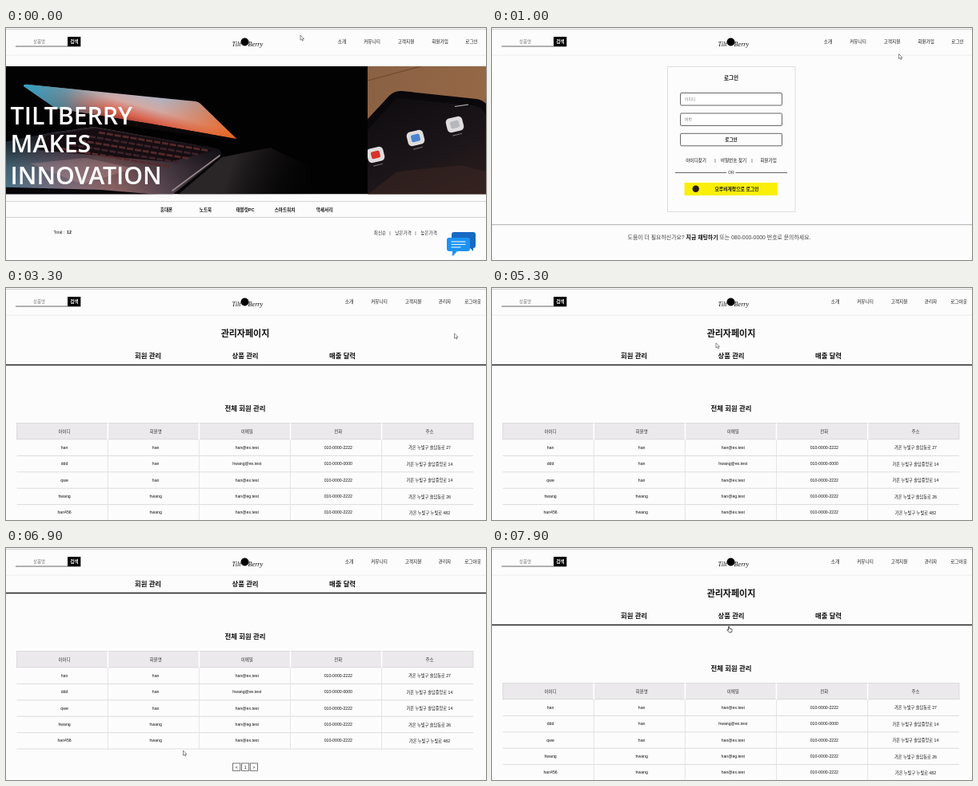
Recreate the animation shown at these times as an HTML page. Size 600x291 px, loop 8000 ms.

```html
<!DOCTYPE html>
<html>
<head>
<meta charset="utf-8">
<title>Shop walkthrough</title>
<style>
html, body { margin: 0; width: 100%; height: 100%; overflow: hidden; background: #fdfcfd; }
svg { display: block; width: 100vw; height: 100vh; }
text { font-family: "Liberation Sans", "Noto Sans CJK KR", "Noto Sans CJK", sans-serif; white-space: pre; }
.hero { font-family: "Open Sans", "Noto Sans", sans-serif; font-weight: 600; }
.logo { font-family: "Liberation Serif", serif; font-style: italic; }
</style>
</head>
<body>
<svg id="stage" viewBox="0 0 600 291" xmlns="http://www.w3.org/2000/svg"></svg>
<script>
const LOOP = 8000, STEP = 100, HEAD_H = 34;
const stage = document.getElementById('stage');
const BG = '#fdfcfd';

// --- drawing helpers: each returns SVG markup ---
const rect = (x, y, w, h, fill, more = '') =>
  `<rect x="${x}" y="${y}" width="${w}" height="${h}" fill="${fill}" ${more}/>`;
const line = (x1, y1, x2, y2, color, w = 1) =>
  `<path d="M${x1} ${y1}L${x2} ${y2}" stroke="${color}" stroke-width="${w}" fill="none"/>`;
const path = (d, fill, more = '') => `<path d="${d}" fill="${fill}" ${more}/>`;
const curve = (d, color, w) => path(d, 'none', `stroke="${color}" stroke-width="${w}" stroke-linecap="round"`);
const dot = (x, y, r, fill) => `<circle cx="${x}" cy="${y}" r="${r}" fill="${fill}"/>`;
const oval = (x, y, rx, ry, turn, fill) =>
  `<ellipse cx="${x}" cy="${y}" rx="${rx}" ry="${ry}" transform="rotate(${turn} ${x} ${y})" fill="${fill}"/>`;
const group = (id, body, more = '') => `<g id="${id}" ${more}>${body}</g>`;
// y is the middle of the line of text
const text = (x, y, s, size = 5.6, weight = 500, fill = '#111', anchor = 'middle', more = '') =>
  `<text x="${x}" y="${y + size * 0.36}" font-size="${size}" font-weight="${weight}" fill="${fill}" text-anchor="${anchor}" ${more}>${s}</text>`;
// from and to are "x,y" points; a colour may carry its own alpha
const gradient = (id, from, to, stops, units = 'userSpaceOnUse') => {
  const [x1, y1] = from.split(','), [x2, y2] = to.split(',');
  return `<linearGradient id="${id}" gradientUnits="${units}" x1="${x1}" y1="${y1}" x2="${x2}" y2="${y2}">${stops.map(([o, c]) =>
    `<stop offset="${o}" stop-color="${c}"/>`).join('')}</linearGradient>`;
};

const defs = () => `<defs>
  <clipPath id="bannerClip"><rect y="48" width="600" height="160.3"/></clipPath>
  <clipPath id="slideClip"><rect x="3" y="48" width="601" height="161"/></clipPath>
  ${gradient('lid', '176,80', '163,126', [[0, '#a9b3c4'], [.4, '#d3a9a4'], [.7, '#d9624c'], [1, '#8a2f24']])}
  ${gradient('lidLeft', '22,80', '135,100', [[0, '#2fa0c4'], [.45, '#4796b0c0'], [1, '#8fa3b400']])}
  ${gradient('lidRight', '190,110', '288,136', [[0, '#e0643000'], [1, '#e8641f']])}
  ${gradient('base', '0,165', '265,165', [[0, '#5f93ab'], [.25, '#9a8ba0'], [.5, '#b07c7c'], [.75, '#6a5560'], [1, '#2a2329']])}
  ${gradient('baseFade', '0,140', '0,208', [[0, '#08070bd0'], [.5, '#08070b60'], [1, '#08070b30']])}
  ${gradient('glow', '285,165', '390,205', [[0, '#2a2526'], [1, '#02020300']])}
  ${gradient('wood', '3,60', '604,200', [[0, '#8a6144'], [.35, '#9a6b47'], [.6, '#8f5c3a'], [.8, '#703f26'], [1, '#4e2616']])}
  ${gradient('glass', '60,80', '120,209', [[0, '#100d10'], [.55, '#1b1519'], [1, '#2a1d1c']])}
  ${gradient('cup', '0,0', '1,1', [[0, '#70402c'], [.4, '#3a1c13'], [1, '#170b08']], 'objectBoundingBox')}
  ${gradient('metal', '0,0', '1,1', [[0, '#3b2b25'], [.4, '#b9a596'], [.6, '#6f594c'], [1, '#c4ae9c']], 'objectBoundingBox')}
</defs>`;

// --- header ---
function menu(id, items) {
  return group(id, items.map(([x, s]) => text(x, 17, s)).join(''));
}
function header() {
  return rect(0, 0, 600, HEAD_H, BG) + line(0, 1.5, 600, 1.5, '#cfcfcf') +
    line(0, 34, 600, 34, '#ececec') +
    text(41.5, 17, '상품명', 5.4, 400, '#777') + line(12, 23, 77, 23, '#666') +
    rect(77, 11, 16.3, 12.3, '#000') + text(85.3, 17.2, '검색', 5.6, 700, '#fff') +
    text(293.5, 20, 'Tilt', 8.2, 400, '#111', 'end', 'class="logo"') +
    dot(298.5, 17.5, 5, '#000') +
    text(302.5, 20, 'Berry', 8.2, 400, '#111', 'start', 'class="logo"') +
    menu('guestMenu', [[420, '소개'], [457.5, '커뮤니티'], [500, '고객지원'], [542.5, '회원가입'], [582, '로그인']]) +
    menu('adminMenu', [[429, '소개'], [466.5, '커뮤니티'], [509, '고객지원'], [548.5, '관리자'], [583.5, '로그아웃']]);
}

// --- home page ---
function laptopSlide() {
  const lid = 'M22 73Q22 70 28 71L236 92Q241 92.5 244 96L288 139L180 120L62 101Z';
  const base = 'M-148 175L0 143L60 131L110 124L262 151Q274 155 266 163L208 209H-148Z';
  let keys = '';
  for (let r = 0; r < 5; r++) {
    const y = 131 + r * 5, x = 116 - r * 12;
    keys += `<path d="M${x} ${y}L${x + 138} ${y + 23}" stroke="${r % 2 ? '#3d222a' : '#54292b'}" stroke-width="2.8" stroke-dasharray="8 2"/>`;
  }
  return rect(-148, 48, 600, 161, '#020203') +
    path('M270 162L330 150L452 209H215Z', 'url(#glow)') +
    path(base, 'url(#base)') + path(base, 'url(#baseFade)') +
    path('M50 135L112 126L262 153L205 168L40 153Z', '#150d11') + keys +
    path('M30 170L100 163L160 176L95 196Z', '#c79a9c', 'opacity=".3"') +
    curve('M267 160L208 204', '#9a8a8c', 1.6) +
    path('M-148 209L-148 196L120 203L190 209Z', '#070609') +
    path(lid, 'url(#lid)') + path(lid, 'url(#lidLeft)') + path(lid, 'url(#lidRight)') +
    path('M34 82L62 101L180 120L288 139L284 141L160 124L60 108Z', '#0c080a');
}
function appIcon(x, y, color) {
  return `<g transform="translate(${x} ${y}) rotate(-14)">${rect(-10.5, -9, 21, 18, '#dfdcdd', 'rx="5"')}${rect(-5.5, -4.5, 11, 9, color, 'rx="2"')}${rect(-6, 12.5, 12, 1.2, '#6f696a')}</g>`;
}
function headphoneSlide() {
  return `<g clip-path="url(#slideClip)">` + rect(3, 48, 601, 161, 'url(#wood)') +
    line(3, 66, 70, 48, '#6d4930', 1.2) + line(150, 90, 215, 72, '#6d4930', 1.2) +
    line(185, 165, 300, 128, '#6d4930', 1.2) +
    // stand at the top
    path('M163 48Q180 66 206 70L336 85Q350 85 354 75L357 48Z', '#e0d8cf') +
    path('M184 48Q196 62 214 65L330 78Q341 78 344 70L348 48Z', '#120e0d') +
    // tablet
    path('M-30 150L30 85Q37 78 46 79L139 89Q150 91 155 100L210 209H-30Z', '#0a080a') +
    path('M3 128L39 88L134 97Q145 98 149 106L199 209H3Z', 'url(#glass)') +
    path('M3 209L40 180L120 172L185 190L194 209Z', '#3a2622', 'opacity=".6"') +
    appIcon(13, 159, '#d8322c') + appIcon(63, 138, '#4b83cf') + appIcon(112, 121, '#b5b7bd') +
    line(112, 98.5, 129, 96, '#bdbdc4', 1.2) +
    // far strap and cup
    path('M468 48H494L506 70L500 84L482 78Z', '#26120c') +
    curve('M498 78Q536 100 534 150Q533 172 526 190', '#29130c', 7) +
    curve('M501 78Q538 102 536 148', '#85604a', 1.2) +
    oval(477, 168, 60, 46, 65, 'url(#cup)') + oval(462, 172, 43, 29, 68, '#1c0c08') +
    // near cup with its metal shell
    oval(366, 196, 56, 40, 52, 'url(#metal)') + oval(356, 202, 40, 26, 58, '#2f211c') +
    oval(409, 173, 66, 42, 58, 'url(#cup)') +
    curve('M372 121Q425 138 438 209', '#6d3c29', 3) +
    // near strap, hinge and arm
    path('M295 48H318L322 78H296Z', '#3a1b12') +
    path('M293 79L318 74L328 83V104L306 112L294 103Z', '#4a2518') +
    path('M293 79L318 74L322 80L299 86Z', '#8f5b41') +
    path('M303 111L327 104L334 132L320 146Q307 140 303 111Z', 'url(#metal)') +
    curve('M325 137Q362 146 379 206', '#c3b2a4', 6) + curve('M322 143Q354 154 370 209', '#37291f', 4) +
    dot(358, 204, 5, '#a8988b') + `</g>`;
}
function home() {
  const hero = (y, s) => `<text class="hero" x="5.6" y="${y}" font-size="30.2" fill="#fff">${s}</text>`;
  const kinds = [[200.5, '휴대폰'], [249.5, '노트북'], [299, '태블릿PC'], [348.5, '스마트워치'], [398, '악세서리']];
  const sorts = [[467.5, '최신순'], [480, '|'], [496.5, '낮은가격'], [512, '|'], [528.5, '높은가격']];
  return `<g clip-path="url(#bannerClip)">${group('slideA', laptopSlide())}${group('slideB', headphoneSlide())}</g>` +
    hero(121, 'TILTBERRY') + hero(156, 'MAKES') + hero(196, 'INNOVATION') +
    line(0, 217.5, 600, 217.5, '#d4d4d4') + line(0, 237.5, 600, 237.5, '#d4d4d4') +
    kinds.map(([x, s]) => text(x, 228, s, 5.6, 700)).join('') +
    text(59.5, 256.5, 'Total :', 5.2, 400, '#222', 'start') + text(76, 256.5, '12', 5.2, 700, '#111', 'start') +
    sorts.map(([x, s]) => text(x, 257, s, 5.6, 400, '#333')).join('') +
    path('M560 256H584Q587 256 587 259V273Q587 276 584 276V280L580 276H560Q557 276 557 273V259Q557 256 560 256Z', '#1769c2') +
    path('M554 263H577Q580 263 580 266V277Q580 280 577 280H564L558 286.5V280H554Q551 280 551 277V266Q551 263 554 263Z', '#1c93f3') +
    [18, 18, 12].map((w, i) => line(556.5, 268 + i * 3.5, 556.5 + w, 268 + i * 3.5, '#e8f4ff', 1.1)).join('');
}

// --- login page ---
function login() {
  const links = [[255, '아이디찾기'], [279, '|'], [302, '비밀번호 찾기'], [325, '|'], [345.5, '회원가입']];
  const field = (id, y) => rect(235.5, y, 127, 15.5, '#fff', `id="${id}" rx="1.5" stroke="#555" stroke-width=".9"`);
  return rect(219.5, 48.5, 159.5, 182, BG, 'stroke="#dedede" stroke-width="1"') +
    text(299, 62.5, '로그인', 6.6, 700) +
    field('idBox', 81.5) + group('idHint', text(241, 89.3, '아이디', 4.8, 400, '#888', 'start')) +
    group('idText', text(241, 89, 'admin', 4.8, 400, '#111', 'start', 'font-style="italic"')) +
    field('pwBox', 107) + group('pwHint', text(241, 114.7, '비번', 4.8, 400, '#777', 'start')) +
    group('pwText', [0, 1, 2, 3].map(i => dot(242.5 + i * 3, 114.7, 1, '#111')).join('')) +
    rect(235.5, 132.3, 127, 15.5, BG, 'rx="1.5" stroke="#555" stroke-width=".9"') + text(299, 140.2, '로그인', 5.6, 600) +
    links.map(([x, s]) => text(x, 166, s, 5.6, 500)).join('') +
    line(229, 181.5, 369, 181.5, '#555', .9) + rect(293, 178, 11.5, 7, BG) + text(298.8, 181.3, 'OR', 5.2, 400, '#333') +
    rect(240.5, 194, 116.5, 16, '#f9ef08') + dot(254.7, 201.8, 4.2, '#2b1b14') +
    text(306, 201.8, '모루비계정으로 로그인', 5.8, 600) +
    line(0, 246.7, 600, 246.7, '#bdbdbd', 1.2) +
    text(284, 263, '도움이 더 필요하신가요? <tspan font-weight="700" fill="#111">지금 채팅하기</tspan> 또는 080-000-0000 번호로 문의하세요.', 6.9, 400, '#444');
}

// --- admin page ---
function admin() {
  const X = 13.5, COL = 114.1, ROW = 20.4, TOP = 169.5, W = COL * 5;
  const [mail, tel] = ['han@ex.test', '010-0000-2222'];
  const rows = [
    ['han', 'han', mail, tel, '가온 누빛구 솔담동로 27'],
    ['ddd', 'han', 'hwang@ex.test', '010-0000-0000', '가온 누빛구 솔담중앙로 14'],
    ['qwe', 'han', mail, tel, '가온 누빛구 솔담중앙로 14'],
    ['hwang', 'hwang', 'han@eg.test', tel, '가온 누빛구 솔담동로 26'],
    ['han456', 'hwang', mail, tel, '가온 누빛구 누빛로 482']
  ];
  const mid = i => X + COL * (i + .5) + 2.5;
  let s = text(299, 57.3, '관리자페이지', 11, 700) +
    [[177.5, '회원 관리'], [299, '상품 관리'], [420.5, '매출 달력']].map(([x, t]) => text(x, 85, t, 8.4, 700)).join('') +
    line(0, 96.5, 600, 96.5, '#222', 1.4) + text(299, 151.3, '전체 회원 관리', 8.4, 700) +
    rect(X, TOP, W, 20.3, '#ebe9eb', 'stroke="#d6d6d6" stroke-width=".8"');
  ['아이디', '회원명', '이메일', '전화', '주소'].forEach((t, i) => s += text(mid(i), 180, t, 5.5, 400, '#333'));
  rows.forEach((r, j) => {
    const y = 200 + j * ROW;
    r.forEach((t, i) => s += text(mid(i), y + (i === 4 ? .5 : 0), t, 5.2, 400, '#111'));
    s += line(X, y + 10.4, X + W, y + 10.4, '#dadada', .9);
  });
  for (let i = 1; i < 5; i++) {
    const x = X + COL * i - .3;
    s += line(x, TOP, x, 190, '#fff', 1.6) + line(x, 190, x, 292, '#e2e2e2', .9);
  }
  ['&lt;', '1', '&gt;'].forEach((t, i) => {
    const x = 283.5 + i * 10.9;
    s += rect(x, 310, 9.3, 9.3, BG, 'stroke="#555" stroke-width=".8"') + text(x + 4.65, 314.7, t, 5, 400);
  });
  return s;
}

const cursors =
  group('arrow', path('M0 0V6.2L1.5 4.9L2.5 7.1L3.5 6.6L2.6 4.6H4.5Z', '#fff', 'stroke="#444" stroke-width=".6"')) +
  group('hand', path('M2 .6Q2.6 -.1 3.2 .6V3L6.1 3.6Q6.8 3.9 6.6 4.8L6 7.7H2.8L.5 5.2Q.2 4.3 1 4.3L2 5Z', '#fff', 'stroke="#222" stroke-width=".75"'));

stage.innerHTML = defs() + rect(0, 0, 600, 291, BG) +
  group('home', home()) + group('login', login()) + group('admin', admin()) +
  group('header', header()) + group('cursor', cursors);

const el = {};
stage.querySelectorAll('[id]').forEach(n => el[n.id] = n);
const show = (id, on) => el[id].setAttribute('display', on ? 'inline' : 'none');
const move = (id, x, y) => el[id].setAttribute('transform', `translate(${x} ${y})`);

// time, x, y, pointer shape until the next stop
const stops = [
  [0, 368, 9, 'arrow'], [500, 582, 11, 'hand'], [900, 578, 14, 'arrow'],
  [1300, 300, 88, 'arrow'], [1800, 310, 114, 'arrow'], [2000, 300, 125, 'arrow'],
  [2200, 271.5, 132, 'hand'], [2700, 272, 132.5, 'arrow'], [3000, 546, 14, 'hand'],
  [3200, 555, 40, 'arrow'], [3300, 560.5, 57, 'arrow'], [3500, 576, 78, 'arrow'],
  [3800, 480, 200, 'arrow'], [4050, 290, 277, 'arrow'], [4400, 66, 170, 'arrow'],
  [4500, 48, 150, 'arrow'], [4800, 172, 84, 'hand'], [4900, 230, 84, 'arrow'],
  [5000, 295, 84, 'hand'], [5100, 422, 84, 'hand'], [5200, 350, 76, 'arrow'],
  [5300, 280, 69, 'arrow'], [5600, 280, 70, 'arrow'], [6400, 240, 170, 'arrow'],
  [6900, 221.5, 254, 'arrow'], [7000, 224, 250, 'arrow'], [7300, 290, 50, 'arrow'],
  [7500, 290, 60, 'arrow'], [7800, 293.5, 97, 'hand'], [7900, 293.5, 98, 'hand']
];

const clamp = v => Math.max(0, Math.min(1, v));
const ease = v => { v = clamp(v); return v * v * (3 - 2 * v); };

function pointer(t) {
  let i = stops.length - 1;
  while (stops[i][0] > t) i--;
  const a = stops[i], b = stops[i + 1] || a;
  const k = b === a ? 0 : (t - a[0]) / (b[0] - a[0]);
  return [a[1] + (b[1] - a[1]) * k, a[2] + (b[2] - a[2]) * k, a[3]];
}

function render(t) {
  const page = t < 700 ? 'home' : t < 2700 ? 'login' : t < 3100 ? 'home' : 'admin';
  for (const p of ['home', 'login', 'admin']) show(p, p === page);
  const member = t >= 2700;
  show('guestMenu', !member);
  show('adminMenu', member);

  // edge between the two banner slides
  const edge = member ? 600 : 452 * Math.pow(1 - clamp(t / 560), 2.24);
  move('slideA', edge - 452, 0);
  move('slideB', edge - 3, 0);

  const filled = t >= 1500, onPw = t >= 1900, typed = t >= 2500;
  show('idHint', !filled);
  show('idText', filled);
  show('pwHint', !typed);
  show('pwText', typed);
  el.idBox.setAttribute('fill', filled ? '#e6edfb' : '#fff');
  el.idBox.setAttribute('stroke-width', t >= 1400 && !onPw ? 1.4 : .9);
  el.pwBox.setAttribute('stroke-width', onPw ? 1.4 : .9);
  el.pwBox.setAttribute('stroke', onPw ? '#111' : '#555');

  move('admin', 0, -40 * (ease((t - 5500) / 500) - ease((t - 7300) / 400)));

  const [x, y, kind] = pointer(t);
  move('cursor', x, y);
  show('cursor', t < 5400 || t >= 5600);
  show('arrow', kind === 'arrow');
  show('hand', kind === 'hand');
}

const start = performance.now();
function tick() {
  const t = (performance.now() - start) % LOOP;
  render(Math.floor(t / STEP) * STEP);
  requestAnimationFrame(tick);
}
tick();
</script>
</body>
</html>
```
